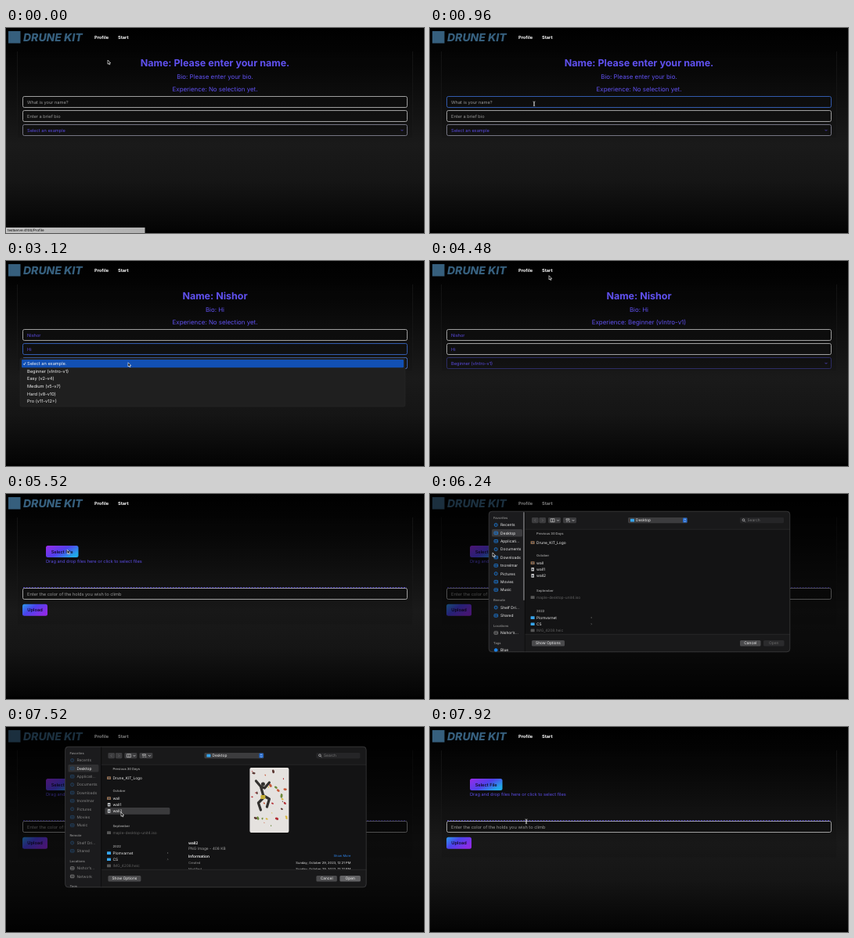
An HTML page that plays this animation: 534 by 262 pixels, repeating every 8000 ms.

```html
<!DOCTYPE html>
<html lang="en">
<head>
<meta charset="utf-8">
<title>Profile form</title>
<style>
html, body { margin: 0; width: 100%; height: 100%; overflow: hidden; background: #000; }
svg { display: block; width: 534px; height: 262px; font-family: Inter, Roboto, sans-serif; text-rendering: geometricPrecision; }
</style>
</head>
<body>
<svg viewBox="0 0 534 262">
  <defs>
    <linearGradient id="bg" x2="0" y2="1">
      <stop offset="0" stop-color="#000"/><stop offset=".1" stop-color="#030303"/>
      <stop offset=".57" stop-color="#1a1a1a"/><stop offset=".75" stop-color="#151515"/>
      <stop offset="1" stop-color="#030303"/>
    </linearGradient>
    <linearGradient id="bar"><stop stop-color="#c2c2c2"/><stop offset="1" stop-color="#b0b0b0"/></linearGradient>
    <linearGradient id="pick" x2="1" y2=".6">
      <stop stop-color="#9a2be8"/><stop offset=".55" stop-color="#5140ec"/><stop offset="1" stop-color="#22a8e8"/>
    </linearGradient>
    <linearGradient id="send" x2="1" y2=".6">
      <stop stop-color="#2a9ae8"/><stop offset=".45" stop-color="#4a43ec"/><stop offset="1" stop-color="#8e2be6"/>
    </linearGradient>
    <clipPath id="panel"><rect x="75" y="22" width="385" height="180" rx="4"/></clipPath>
    <clipPath id="body"><rect x="75" y="22" width="385" height="157"/></clipPath>
  </defs>
  <g id="stage"></g>
</svg>
<script>
const LOOP = 8000;
const stage = document.getElementById('stage');
const INDIGO = '#6051f0', VALUE = '#5a4be0', GREY = '#979797', RIM = '#c4c4c4', LOGO = '#365f7d';
const USER = 'Nishor', BIO = 'Hi';
const LEVELS = ['Select an example.', 'Beginner (vIntro-v1)', 'Easy (v2-v4)', 'Medium (v5-v7)', 'Hard (v8-v10)', 'Pro (v11-v12+)'];

// Moments in ms
const T = {
  linkOut: 400, nameFocus: 800, nameType: 1000, bioFocus: 1920, bioType: 2320,
  open: 2800, choose: 3920, linkIn: 4560, start: 4800, startOut: 5440,
  dialog: 5840, settle: 6300, pick: 7120, close: 7760
};

// Pointer stops: time, x, y
const PATH = [
  [0, 130, 41], [240, 130, 43], [720, 133, 94], [1640, 133, 95], [2000, 160, 106],
  [2080, 161, 106], [2480, 161, 109], [2760, 156, 129], [3280, 156, 130], [3760, 150, 140],
  [3960, 150, 140], [4400, 152, 19], [4840, 152, 15], [5600, 76, 73], [5900, 78, 74],
  [6240, 80, 75], [6480, 84, 77], [7040, 145, 108], [7520, 147, 109], [7720, 147, 109],
  [7920, 123, 118], [8000, 123, 118]
];

const clamp = v => Math.max(0, Math.min(1, v));
const smooth = v => v * v * (3 - 2 * v);
const typed = (word, t, from, step) => word.slice(0, Math.max(0, Math.floor((t - from) / step) + 1));

function pointAt(t) {
  let i = 0;
  while (i < PATH.length - 2 && t >= PATH[i + 1][0]) i++;
  const [a, x, y] = PATH[i], [b, u, v] = PATH[i + 1];
  const k = smooth(clamp((t - a) / (b - a)));
  return [x + (u - x) * k, y + (v - y) * k];
}

const rect = (x, y, w, h, fill, r = 0, more = '') =>
  `<rect x="${x}" y="${y}" width="${w}" height="${h}" fill="${fill}" rx="${r}" ${more}/>`;
// y is the middle of the capitals
const text = (s, x, y, size, fill, more = '') =>
  `<text x="${x}" y="${y + size * .364}" font-size="${size}" fill="${fill}" ${more}>${s}</text>`;
const line = (x, y, u, v, stroke, more = '') =>
  `<path d="M${x} ${y}L${u} ${v}" stroke="${stroke}" fill="none" ${more}/>`;
const MID = ' text-anchor="middle"', END = ' text-anchor="end"';
const BOLD = ' font-weight="700"', SEMI = ' font-weight="600"', MEDIUM = ' font-weight="500"';

const chevron = (x, y, c) => `<path d="M${x - 1.5} ${y - .7}l1.5 1.5l1.5 -1.5" fill="none" stroke="${c}" stroke-width=".7"/>`;

function header() {
  return rect(0, 0, 534, 262, 'url(#bg)') + rect(0, 259, 534, 3, '#000', 0, 'opacity=".6"')
    + rect(3, 4, 15.5, 15.5, LOGO)
    + text('DRUNE KIT', 22, 11.8, 14, LOGO, 'font-weight="800" font-style="italic"')
    + text('Profile', 113, 12.4, 5.67, '#fff', BOLD)
    + text('Start', 143, 12.4, 5.67, '#fff', BOLD);
}

const card = bottom => rect(14, 25, 506, bottom - 25, '#000', 2, 'fill-opacity=".08"')
  + `<path d="M14.5 30V${bottom - .5}H519.5V30" fill="none" stroke="#1a1a1a" stroke-width=".7"/>`;

const outline = (y, stroke) => rect(21.5, y, 491, 14, '#0b0b0b', 2, `fill-opacity=".25" stroke="${stroke}" stroke-width=".8"`);

const field = (y, label, color, border = RIM) => outline(y, border) + text(label, 27, y + 7.5, 5.67, color);

function dropdown() {
  let out = outline(123.5, '#2f62c4')
    + rect(18, 124, 492, 62, '#1f1f1f', 2, 'stroke="#2b2b2b" stroke-width=".5"')
    + rect(20, 126, 488, 10.2, '#1250b4', 1)
    + '<path d="M22.3 131.3l1 1.5l1.7 -3.3" fill="none" stroke="#fff" stroke-width=".7"/>';
  LEVELS.forEach((s, i) => out += text(s, 27, 131.1 + i * 9.65, 5.67, '#f2f2f2'));
  return out;
}

function profile(t) {
  const name = typed(USER, t, T.nameType, 110);
  const bio = typed(BIO, t, T.bioType, 160);
  const chosen = t >= T.choose;
  const opened = t >= T.open && !chosen;
  const nameOn = t >= T.nameFocus && t < T.bioFocus;
  const bioOn = t >= T.bioFocus && !chosen;
  const ring = on => on ? '#3d6fd6' : RIM;
  return header() + card(141)
    + text('Name: ' + (name || 'Please enter your name.'), 267, 44.3, 12.5, INDIGO, MID + BOLD)
    + text('Bio: ' + (bio || 'Please enter your bio.'), 267, 62, 7.9, INDIGO, MID)
    + text('Experience: ' + (chosen ? LEVELS[1] : 'No selection yet.'), 267, 78, 7.9, INDIGO, MID)
    + field(87.5, name || 'What is your name?', name ? VALUE : GREY, ring(nameOn))
    + field(105.5, bio || 'Enter a brief bio', bio ? VALUE : GREY, ring(bioOn))
    + field(123.5, chosen ? LEVELS[1] : 'Select an example', VALUE, chosen ? '#34347c' : '#8f8fa0')
    + chevron(506, 130.6, INDIGO)
    + (opened ? dropdown() : '');
}

function upload() {
  return header() + card(167.5)
    + rect(51, 66, 41.5, 15, 'url(#pick)', 2.5)
    + text('Select File', 71.7, 73.5, 5.67, '#08040f', MID + MEDIUM)
    + text('Drag and drop files here or click to select files', 51, 85.5, 5.67, VALUE)
    + field(120.5, 'Enter the color of the holds you wish to climb', GREY)
    + line(22, 119.7, 512, 119.7, INDIGO, 'stroke-width=".9" stroke-dasharray="2 1.6"')
    + rect(21, 140.8, 32, 15, 'url(#send)', 2.5)
    + text('Upload', 37, 148.2, 5.67, '#08040f', MID + MEDIUM);
}

function sidebar(settled, faded) {
  const groups = [
    [31, 'Favorites', 39.5, ['Recents', 'Desktop', 'Applicati…', 'Documents', 'Downloads', 'tnorelmar', 'Pictures', 'Movies', 'Music']],
    [136, 'Remote', 145, ['Shelf Dri…', 'Shared']],
    [169, 'Locations', 177.5, settled ? ['Nishor’s…', 'Network'] : ['Nishor’s…']],
    [settled ? 201 : 191, 'Tags', settled ? 210 : 199.5, ['Blue']]
  ];
  const ink = faded ? '#858585' : '#ededed', tint = faded ? '#24486c' : '#1e82e6';
  let out = rect(75, 22, 46, 180, '#1b1b1d') + rect(79, 45, 39, 9.4, faded ? '#303032' : '#3a3a3d', 1.5);
  groups.forEach(([y, title, top, rows], g) => {
    out += text(title, 81, y, 4.1, '#858585', SEMI);
    rows.forEach((s, i) => {
      const cy = top + i * 10.38;
      const lit = s === 'Desktop' ? '#f2f2f2' : ink;
      const tone = g === 2 ? '#8d8d8d' : tint;
      out += (i % 3 || g === 2 ? rect(82, cy - 1.8, 4.6, 3.6, 'none', .7, `stroke="${tone}" stroke-width=".8"`)
          + line(82.5, cy, 86, cy, tone, 'stroke-width=".7"')
        : `<circle cx="84.2" cy="${cy}" r="2" fill="${g === 3 ? tone : 'none'}" stroke="${tone}" stroke-width=".8"/>`
          + line(84.2, cy - 1, 84.2, cy + .4, tone, 'stroke-width=".6"'))
        + text(s, 90, cy, 4.9, lit);
    });
  });
  if (!settled) out += rect(119, 23, 2, 113, '#636366', 1);
  return out + line(121.3, 22, 121.3, 202, '#080808', 'stroke-width=".7"');
}

function toolbar() {
  const btn = (x, w) => rect(x, 30, w, 7.2, '#3c3c3e', 1.4);
  const mark = (d, c = '#d8d8d8') => `<path d="${d}" fill="none" stroke="${c}" stroke-width=".6"/>`;
  return btn(130, 8.6) + btn(139.4, 8.6) + btn(151, 16) + btn(170, 17)
    + mark('M135 32.2l-1.5 1.5l1.5 1.5M143 32.2l1.5 1.5l-1.5 1.5', '#707070')
    + mark('M154 31.7h5v4h-5zM156.5 31.7v4M174 31.8h4v1.5h-4zM174 35.2h2M177 35.2h2')
    + chevron(163.5, 33.6, '#d8d8d8') + chevron(183, 33.6, '#d8d8d8')
    + rect(253, 30, 76, 7.2, '#3c3c3e', 1.4) + rect(256, 31.8, 5, 3.7, '#36a4ec', .6)
    + text('Desktop', 263, 33.6, 4.85, '#f0f0f0')
    + rect(323, 30.6, 5.4, 6, '#1f66cc', 1.2) + mark('M324.5 33l1.2 -1.2l1.2 1.2M324.5 34.3l1.2 1.2l1.2 -1.2', '#fff')
    + rect(396, 30, 56, 7.2, '#252527', 1.4)
    + '<circle cx="400.5" cy="33.2" r="1.4" fill="none" stroke="#d8d8d8" stroke-width=".6"/>'
    + mark('M401.5 34.3l1.4 1.4') + text('Search', 405.5, 33.7, 4.85, '#777')
    + line(121.5, 45.2, 460, 45.2, '#2d2d2f', 'stroke-width=".7"');
}

function files(picked) {
  const heads = [[51, 'Previous 30 Days'], [79, 'October'], [123.7, 'September'], [149.5, '2022']];
  const rows = [
    [62, 'Drune_KIT_Logo', 'img'], [88, 'wall', 'img'], [96.2, 'wall1', 'doc'], [104.4, 'wall2', 'doc'],
    [132, 'maple-desktop-unit4.iso', 'off'], [158, 'Plomvarnet', 'dir'], [166.2, 'CS', 'dir'], [174.4, 'IMG_4208.heic', 'off']
  ];
  const tone = { img: '#8e6a4c', doc: '#c9c9c9', off: '#565656', dir: '#36a4ec' };
  let out = picked ? rect(126, 100, 83, 8.8, '#3a3a3c', 1.5) : '';
  heads.forEach(([y, s]) => out += text(s, 136, y, 4.1, '#9b9b9b', SEMI));
  rows.forEach(([y, s, kind]) => {
    const doc = kind === 'doc';
    out += rect(doc ? 129.4 : 128.6, y - (doc ? 2.3 : 1.8), doc ? 3.6 : 5, doc ? 4.6 : 3.7, tone[kind], .5)
      + (kind === 'img' || doc ? rect(130.2, y - .6, 2, 1.5, '#39414e') : '')
      + text(s, 136, y, 4.85, kind === 'off' ? '#626262' : '#efefef');
    if (kind === 'dir') out += `<path d="M205.7 ${y - 1}l1 1l-1 1" fill="none" stroke="#777" stroke-width=".6"/>`;
  });
  return out;
}

// Flat stand-in for the wall picture
function picture() {
  const hues = ['#b32d34', '#6d8b3c', '#d9b73a', '#5d3a35', '#c65a3c'];
  let seed = 11, out = rect(311, 49, 50, 83, '#e5e2df', 2);
  const rnd = () => (seed = seed * 16807 % 2147483647) / 2147483647;
  for (let i = 0; i < 32; i++) {
    const x = 314 + rnd() * 44, y = 52 + rnd() * 77, r = .7 + rnd() * 1.7;
    out += `<ellipse cx="${x}" cy="${y}" rx="${r}" ry="${r * .65}" fill="${hues[i % 5]}" transform="rotate(${rnd() * 90} ${x} ${y})"/>`;
  }
  return out + '<path d="M319 66l6 7l5 2l6 -7M325 73l4 14l-7 7l3 9M329 85l7 4l-3 10" fill="none" stroke="#33312f" stroke-width="3.2" stroke-linecap="round" stroke-linejoin="round"/>'
    + '<circle cx="328" cy="70" r="2.5" fill="#33312f"/>' + rect(325, 84, 6, 5, '#c5ae35', 1);
}

function preview() {
  const when = 'Sunday, October 29, 2023, 12:21 PM';
  const row = (label, y) => text(label, 232.5, y, 4.1, '#949494') + text(when, 440, y, 4.1, '#e2e2e2', END);
  return picture()
    + text('wall2', 232.5, 145.2, 4.9, '#f2f2f2', SEMI)
    + text('PNG Image - 408 KB', 232.5, 152.7, 4.85, '#a2a2a2')
    + text('Information', 232.5, 162, 4.85, '#f2f2f2', SEMI)
    + text('Show More', 440, 162, 4.1, '#2f87ee', END)
    + row('Created', 170.3) + row('Modified', 178.7);
}

function dialog(t) {
  const settled = t > T.settle, picked = t >= T.pick;
  const k = smooth(clamp((t - T.settle) / 160));
  const show = clamp((t - T.dialog) / 160);
  const button = (s, x, w, fill, ink) => rect(x, 187, w, 7.4, fill, 1.5) + text(s, x + w / 2, 190.7, 4.85, ink, MID);
  return rect(0, 0, 534, 262, '#000', 0, `opacity="${.5 * show}"`)
    + `<g opacity="${show}" transform="translate(${.4 * k} ${3 * k})"><g clip-path="url(#panel)">`
    + rect(75, 22, 385, 180, '#131314') + rect(121, 22, 339, 23, '#19191a')
    + sidebar(settled, picked) + toolbar()
    + `<g clip-path="url(#body)">${files(picked)}${picked ? preview() : ''}</g>`
    + rect(121.6, 179, 339, 23, '#19191a') + line(121.6, 179.3, 460, 179.3, '#2d2d2f', 'stroke-width=".7"')
    + button('Show Options', 130, 42, '#4a4a4c', '#f0f0f0')
    + button('Cancel', 396, 26.5, '#4a4a4c', '#f0f0f0')
    + button('Open', 426, 26.5, picked ? '#626264' : '#2b2b2d', picked ? '#f5f5f5' : '#6a6a6a')
    + '</g>' + rect(75.2, 22.2, 384.6, 179.6, 'none', 4, 'stroke="#48484a" stroke-width=".6"') + '</g>';
}

const status = page => rect(0, 255, 177.5, 7, 'url(#bar)') + text('testserve:4100/' + page, 2, 258.4, 4.5, '#000');

function pointer(t) {
  const [x, y] = pointAt(t);
  const beam = (t > 680 && t < 2640) || t > 7880;
  return `<g transform="translate(${x} ${y}) scale(.9)">` + (beam
    ? '<path d="M-1.6 -.2q1.6 0 1.6 1v4.4q0 1 -1.3 1M1.6 -.2q-1.6 0 -1.6 1v4.4q0 1 1.3 1" fill="none" stroke="#ddd" stroke-width=".8"/>'
    : '<path d="M0 0v5.8l1.3 -1.2l.9 2l1 -.5l-.9 -1.9h1.8z" fill="#000" stroke="#fff" stroke-width=".7"/>') + '</g>';
}

function draw(t) {
  let out = t < T.start ? profile(t) : upload();
  if (t >= T.dialog && t < T.close) out += dialog(t);
  if (t < T.linkOut) out += status('Profile');
  if (t >= T.linkIn && t < T.startOut) out += status('Start');
  stage.innerHTML = out + pointer(t);
}

const began = performance.now();
function tick() {
  draw((performance.now() - began) % LOOP);
  requestAnimationFrame(tick);
}
draw(0);
requestAnimationFrame(tick);
</script>
</body>
</html>
```
